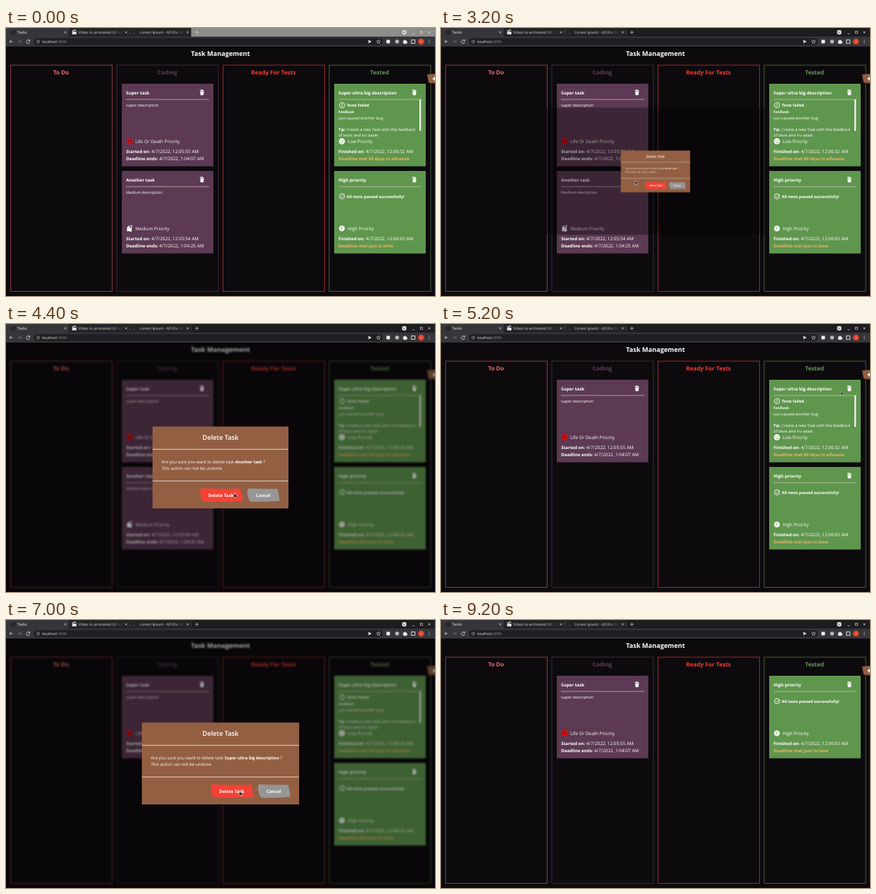
An HTML page that plays this animation: 600x375 px, repeating every 9.3 s.

```html
<!DOCTYPE html>
<html lang="en">
<head>
<meta charset="utf-8">
<title>Task Management</title>
<style>
  html, body { margin: 0; width: 100%; height: 100%; overflow: hidden; background: #0d0a0e; }
  #stage { position: relative; width: 600px; height: 375px; overflow: hidden; }
  svg { position: absolute; left: 0; top: 0; display: block; }
  text { font-family: "Open Sans", "Noto Sans", sans-serif; text-rendering: geometricPrecision; white-space: pre; }
  .bold { font-weight: 700; }
  tspan.bold { font-size: .96em; }
  #overlay { position: absolute; left: 0; top: 26px; width: 600px; height: 349px;
    background: rgba(0, 0, 0, .35); backdrop-filter: blur(1px); }
</style>
</head>
<body>
<div id="stage">
  <svg id="board" width="600" height="375"></svg>
  <div id="overlay"><svg id="dialog" width="600" height="349" viewBox="0 26 600 349"></svg></div>
  <svg id="pointer" width="600" height="375"></svg>
</div>
<script>
const LOOP = 9300, STEP = 100;
const FOCUS_AT = 2900;
const DIALOGS = [
  { open: 3050, close: 4500, task: 'Another task', width: 190 },
  { open: 5500, close: 7200, task: 'Super ultra big description', width: 220 },
];
const OPEN_TIME = 300;
// time, x, y of the pointer tip
const PATH = [
  [1100, 420, 16], [1600, 256.5, 92], [1900, 256.5, 92], [2700, 271.5, 213.5], [3300, 271.5, 213.5],
  [4100, 319, 236], [4500, 319, 236], [5300, 570, 88], [5500, 570, 88], [5900, 525.5, 122.5],
  [6800, 326.5, 238.5], [8000, 326.5, 238.5], [8400, 130, 265], [8900, 530, 18],
];
const $ = id => document.getElementById(id);

const text = (x, y, s, size, fill = '#fff', attrs = '') =>
  `<text x="${x}" y="${y}" font-size="${size}" fill="${fill}" ${attrs}>${s}</text>`;
const rect = (x, y, w, h, fill, attrs = '') =>
  `<rect x="${x}" y="${y}" width="${w}" height="${h}" fill="${fill}" ${attrs}/>`;
const circle = (x, y, r, fill, attrs = '') => `<circle cx="${x}" cy="${y}" r="${r}" fill="${fill}" ${attrs}/>`;
const line = (d, color = '#ddd', width = .8) => `<path d="${d}" fill="none" stroke="${color}" stroke-width="${width}"/>`;
const at = (x, y, body, id = '') => `<g ${id && `id="${id}"`} transform="translate(${x} ${y})">${body}</g>`;
const bold = s => `<tspan class="bold">${s}</tspan>`;
const BOLD = 'class="bold"', MIDDLE = 'class="bold" text-anchor="middle"';

function browser() {
  const close = x => line(`M${x - 1.5} 4.5l3 3m0-3l-3 3`, '#ccc', .7);
  return `<defs><linearGradient id="fade"><stop offset=".75" stop-color="#ccc"/>
      <stop offset="1" stop-color="#ccc" stop-opacity="0"/></linearGradient></defs>` +
    rect(0, 0, 600, 13, '#8e8c89', 'id="frame"') + rect(88, 0, 171, 12, '#242427') +
    rect(0, 12, 600, 14, '#35353a') + rect(0, 0, 88, 13, '#35353a', 'rx="2"') +
    line('M7 4.5h2m1 0h3M7 6.5h2m1 0h3M7 8.5h2m1 0h3', '#111', 1) +
    text(15.5, 8, 'Tasks', 5.6, '#eee') + close(83) +
    rect(92.5, 5, 6, 4, '#ddd') + line('M92.5 4.2l5.5-1.6', '#ddd', 1.2) +
    text(101, 8, 'Video to animated GIF co', 5.4, 'url(#fade)') + close(168) +
    line('M174 3v6M259 3v6', '#666', .6) + line('M178 8h3', '#555') +
    text(187, 8, 'Lorem Ipsum - All the fac', 5.4, 'url(#fade)') + close(254) +
    line('M264.5 6h5M267 3.5v5', '#ccc') +
    circle(557, 6, 3.2, '#d8d8d8') + line('M555.6 5.4l1.4 1.5 1.4-1.5', '#333', .7) +
    line('M568.5 8h3M579.5 4.5h3v3h-3zM590.5 4.5l3 3m0-3l-3 3', '#ddd', .7) +
    line('M9.5 19H5m2-2l-2 2 2 2') + line('M17 19h4.5m-2-2l2 2-2 2', '#777') +
    line('M32.7 17.6a2.4 2.4 0 1 0 .5 1.9M33.2 16v2h-2') +
    rect(39, 14, 488, 10, '#202024', 'rx="5"') +
    circle(45, 19, 2, 'none', 'stroke="#bbb" stroke-width=".6"') + line('M45 18.6v1.4', '#bbb', .6) +
    text(50.5, 21, 'localhost<tspan fill="#999">:3000</tspan>', 5.1, '#eee') +
    '<path d="M506.500 16.500l5 2.500-5 2.500.6-2.500z" fill="#ddd"/>' +
    line('M521 16.400l.8 1.700 1.900.2-1.400 1.300.4 1.900-1.700-1-1.700 1 .4-1.900-1.400-1.300 1.900-.2z', '#ddd', .6) +
    rect(532, 16.5, 5, 5, '#eee', 'rx="1"') + circle(547, 19, 2.7, '#bbb') +
    '<path d="M555.5 17.500h1.500a1 1 0 0 1 2 0h1.500v1.500a1 1 0 0 1 0 2v1h-5z" fill="#eee"/>' +
    rect(567, 16.7, 5, 4.6, 'none', 'stroke="#eee" stroke-width=".9"') +
    circle(580.5, 19, 4.2, '#e8412c') + text(580.5, 20.3, 'a', 4, '#fff', 'text-anchor="middle"') +
    [17, 19, 21].map(y => circle(592, y, .6, '#ddd')).join('');
}

const column = (x, title, color, border) =>
  rect(x, 52, 142, 316.5, 'none', `stroke="${border}" stroke-width=".8"`) +
  text(x + 70.5, 65, title, 8.1, color, MIDDLE);

const trash = at(112, 12, `<path d="M-2.500-1.500h5.200l-.5 5.500h-4.200z" fill="#fff"/>` +
  line('M-3-3.200l5.800 1M-.8-3.600l1.800.3', '#fff', 1));

const icons = {
  skull: `<g id="skull"><path d="M-4.200-.8C-4.200-5.500 4.200-5.500 4.200-.8 4.200 1 3 1.500 2.600 2V4h-5.200V2C-3 1.500-4.200 1-4.200-.8z" fill="#e00d0d"/>
    <circle cx="-1.700" cy="-.4" r="1.100" fill="#5a1020"/><circle cx="1.700" cy="-.4" r="1.100" fill="#5a1020"/>
    <path d="M-.9 4V2.600M.9 4V2.600" stroke="#5a1020" stroke-width=".5"/></g>`,
  bell: '<path d="M-3.500 2.500V0C-3.500-3-1-4-.3-4L0-1h3V2.500l1 1.200h-8z" fill="#fff"/>' +
    line('M1-4h2.500L1.200-1.800h2.500', '#fff', .8) + circle(1, 3.8, 1, '#fff'),
  smile: circle(0, 0, 4.2, '#fff') + circle(-1.5, -1, .7, '#5f964d') + circle(1.5, -1, .7, '#5f964d') +
    line('M-2 1.200Q0 3.300 2 1.200', '#5f964d', .8),
  alarm: circle(0, 0, 3.7, '#fff', 'stroke="#fff" stroke-width="1" stroke-dasharray="1.6 1.2"') +
    line('M0-2.300V.6M0 1.400v1', '#5f964d', 1),
  ring: circle(0, 0, 3.6, 'none', 'stroke="#fff" stroke-width=".9"'),
};
icons.failed = icons.ring + line('M0-2V.5M0 1.200v.9', '#fff', .9);
icons.passed = icons.ring + line('M-1.700 0l1.300 1.300L3.500-2.600', '#fff', .9);

function card({ id, x, y, color, title, body, icon, priority, first, second }) {
  return at(x, y, rect(0, 0, 128, 115.5, color) +
    text(6, 15, title, 6.15, '#fff', BOLD) + trash + line('M6 22H122', '#d8c3c0', .7) + body +
    at(10.8, 80.5, icons[icon]) + text(19, 83, priority + ' Priority', 6.3) +
    text(6, 97, first, 6.35) + text(6, 106.7, second, 6.35, '#fff'), id);
}
const PURPLE = '#5c3a53', GREEN = '#5f964d';
const reward = s => `<tspan class="bold" fill="#f0b468">${s}</tspan>`;
const cards = [
  { id: 'super', x: 162, y: 78, color: PURPLE, title: 'Super task', body: text(6, 31.5, 'super description', 5.55),
    icon: 'skull', priority: 'Life Or Death',
    first: bold('Started on:') + ' 4/7/2022, 12:05:55 AM', second: bold('Deadline ends:') + ' 4/7/2022, 1:04:07 AM' },
  { id: 'another', x: 162, y: 200, color: PURPLE, title: 'Another task', body: text(6, 31.5, 'Medium description', 5.4),
    icon: 'bell', priority: 'Medium',
    first: bold('Started on:') + ' 4/7/2022, 12:05:54 AM', second: bold('Deadline ends:') + ' 4/7/2022, 1:04:25 AM' },
  { id: 'failed', x: 459, y: 78, color: GREEN, title: 'Super ultra big description',
    body: '<clipPath id="scroll"><rect y="22" width="128" height="52.500"/></clipPath><g clip-path="url(#scroll)">' +
      at(11, 30, icons.failed) + text(17.5, 32.3, 'Tests failed', 5.6, '#fff', BOLD) +
      text(6, 41, 'Feedback', 4.65, '#fff', BOLD) + text(6, 49.7, 'just caused another bug', 5.55) +
      text(6, 66, bold('Tip:') + ' Create a new Task with the feedback', 5.7) +
      text(6, 74, 'of tests and try again.', 5.7) + '</g>' + rect(119.2, 22, 2.2, 44, '#f4f4f4'),
    icon: 'smile', priority: 'Low',
    first: bold('Finished on:') + ' 4/7/2022, 12:06:32 AM', second: reward('Deadline met 69 days in advance') },
  { id: 'high', x: 459, y: 200, color: GREEN, title: 'High priority',
    body: at(11, 35.5, icons.passed) + text(17.5, 37.6, 'All tests passed successfully!', 5.65, '#fff', BOLD),
    icon: 'alarm', priority: 'High',
    first: bold('Finished on:') + ' 4/7/2022, 12:06:03 AM', second: reward('Deadline met just in time') },
];

$('board').innerHTML = rect(0, 0, 600, 375, '#0d0a0e') + browser() +
  text(300, 39, 'Task Management', 9.05, '#fff', MIDDLE) +
  column(6.5, 'To Do', '#f0706a', '#a8484c') + column(155, 'Coding', '#5f3d57', '#4a3046') +
  column(303.5, 'Ready For Tests', '#f53d33', '#b8322e') + column(452, 'Tested', '#62994f', '#52713f') +
  cards.map(card).join('') +
  '<path d="M589 65l11-1v13.500l-9-1z" fill="#935f42"/>' + line('M596.500 71h3.500M599 68.500v5', '#fff', 1.3);

function dialog({ task, width }) {
  const left = 300 - width / 2, right = 300 + width / 2;
  const button = (x, w, label, color) =>
    `<path d="M${x - w / 2 + 2} 230Q${x} 231 ${x + w / 2 - 3} 230.500q3 9 3 17Q${x} 249.500 ${x - w / 2 + 5} 248.500q-6-9-3-18.500z" fill="${color}"/>` +
    text(x, 241.5, label, 6.15, '#fff', MIDDLE);
  return rect(left, 143.5, width, 114.5, '#935f42') +
    text(300, 162.3, 'Delete Task', 9.2, '#fff', 'font-weight="600" text-anchor="middle"') +
    line(`M${left} 175.300H${right}M${left} 219.700H${right}`, '#eee', .8) +
    text(left + 12.5, 195, `Are you sure you want to delete task ${bold(task)} ?`, 6) +
    text(left + 12.5, 204.4, 'This action can not be undone.', 6) +
    button(right - 94.3, 60, 'Delete Task', '#f54236') + button(right - 35.5, 46, 'Cancel', '#969696');
}

$('pointer').innerHTML = at(0, 0,
  '<path id="arrow" d="M0 0V5.600L1.300 4.500 2.200 6.600 3.200 6.200 2.300 4.200H4z" fill="#111" stroke="#eee" stroke-width=".5"/>' +
  '<path id="hand" d="M0 .4q.6-.8 1.200 0V2.600L3.600 3.200V5.200L3 6.800H.6L-1 4.200-.2 3.800z" fill="#111" stroke="#fff" stroke-width=".6"/>',
  'cursor');

const show = (id, on) => { $(id).style.display = on ? '' : 'none'; };
const ease = p => p * p * (3 - 2 * p);

function pointerAt(t) {
  const i = PATH.findIndex(p => p[0] > t);
  if (i < 1) return PATH[i < 0 ? PATH.length - 1 : 0].slice(1);
  const [t0, x0, y0] = PATH[i - 1], [t1, x1, y1] = PATH[i];
  const p = ease((t - t0) / (t1 - t0));
  return [x0 + (x1 - x0) * p, y0 + (y1 - y0) * p];
}

let shown = null;
function draw(t) {
  $('frame').setAttribute('fill', t < FOCUS_AT ? '#8e8c89' : '#1d1d20');
  show('another', t < DIALOGS[0].close);
  show('failed', t < DIALOGS[1].close);
  $('high').setAttribute('transform', `translate(459 ${t < DIALOGS[1].close ? 200 : 78})`);

  const wave = Math.sin(t / 1000 * 2 * Math.PI);
  $('skull').setAttribute('transform', `rotate(${18 * wave}) scale(${1 + .08 * wave})`);

  const active = DIALOGS.find(d => t > d.open && t < d.close);
  show('overlay', active);
  if (active) {
    if (shown !== active) $('dialog').innerHTML = dialog(shown = active);
    $('overlay').style.transform = `scale(${Math.min(1, (t - active.open) / OPEN_TIME + .01)})`;
  }

  const [x, y] = pointerAt(t);
  const overButton = active && t > active.open + 600 && y > 229 && Math.abs(x - (300 + active.width / 2 - 94.3)) < 30;
  show('cursor', t >= 1100 && t < 9000);
  show('hand', overButton);
  show('arrow', !overButton);
  $('cursor').setAttribute('transform', `translate(${x} ${y})`);
}

const start = performance.now();
(function tick() {
  const t = (performance.now() - start) % LOOP;
  draw(Math.floor(t / STEP) * STEP);
  requestAnimationFrame(tick);
})();
</script>
</body>
</html>
```
